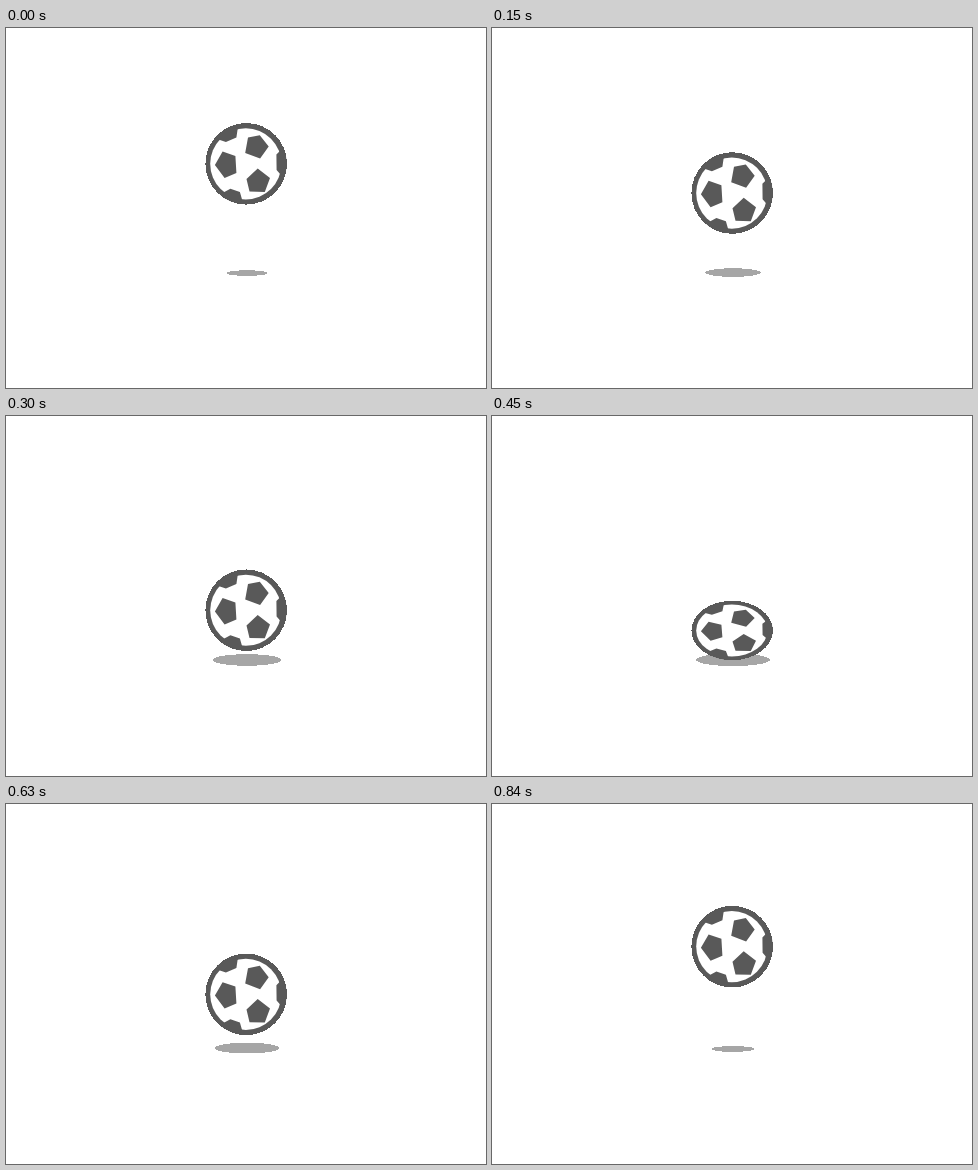
Write an HTML page that moves like this. It is 480 px wide and 360 px high and loops after 0.87 s.

```html
<!DOCTYPE html>
<html lang="en">
<head>
<meta charset="utf-8">
<title>Bouncing ball</title>
<style>
  html, body { margin: 0; width: 100%; height: 100%; overflow: hidden; background: #fff; }
  svg { display: block; width: 100%; height: 100%; }
  .crisp { shape-rendering: crispEdges; }
</style>
</head>
<body>
<svg viewBox="0 0 480 360">
  <defs>
    <clipPath id="round"><circle r="40.5"/></clipPath>
  </defs>
  <ellipse id="shadow" class="crisp" cx="241" fill="#a6a6a6"/>
  <g id="ball" fill="#595959">
    <circle class="crisp" r="40.8"/>
    <circle cx="-.4" r="35.6" fill="#fff"/>
    <path d="M1.8-26.2 13.6-28.5 22.5-17.2 13.9-5.2-1-10.8Z
      M-31.3 1.2-23.6-12.2-10.8-7.8-9.8 9.2-21.6 14.2Z
      M.3 15.2 11.5 4.7 23.8 14.2 18.6 28.1 3.3 27.8Z"/>
    <path clip-path="url(#round)" d="M-30-25-20.3-21.8-9.8-26.3-8.3-36.5-15-42-32-32Z
      M-27 31-15.8 24.9-6.3 28.2-3.8 37-8 42-22 40Z
      M35-14 30.2-9.2 30.4 6.2 34.5 11 42 10 42-12Z"/>
  </g>
</svg>
<script>
const LOOP = 870, STEP = 30;
const LAND = 350, FLAT = 460, LIFT = 570;
const HIGH = 135.8, LOW = 204, PIVOT = 38.5;
const ball = document.getElementById('ball');
const shadow = document.getElementById('shadow');
const mix = (a, b, k) => a + (b - a) * k;

function draw(time) {
  const t = Math.floor((time % LOOP) / STEP) * STEP;
  let drop = 1, squash = 1, width = 74;
  if (t < LAND) {
    drop = t / LAND;
    width = mix(41, 74, drop);
  } else if (t < LIFT) {
    squash = mix(0.7, 1, Math.abs(t - FLAT) / (LIFT - FLAT));
  } else {
    drop = 1 - (t - LIFT) / (LOOP - LIFT);
    width = mix(39.5, 71.5, drop);
  }
  const y = mix(HIGH, LOW, drop) + PIVOT * (1 - squash);
  ball.setAttribute('transform', `translate(240.2 ${y}) scale(1 ${squash})`);
  shadow.setAttribute('rx', width / 2);
  shadow.setAttribute('ry', mix(2.8, 6.3, (width - 41) / 33));
  shadow.setAttribute('cy', mix(245.1, 243.8, drop));
}

const start = performance.now();
function tick() {
  draw(performance.now() - start);
  requestAnimationFrame(tick);
}
tick();
</script>
</body>
</html>
```
